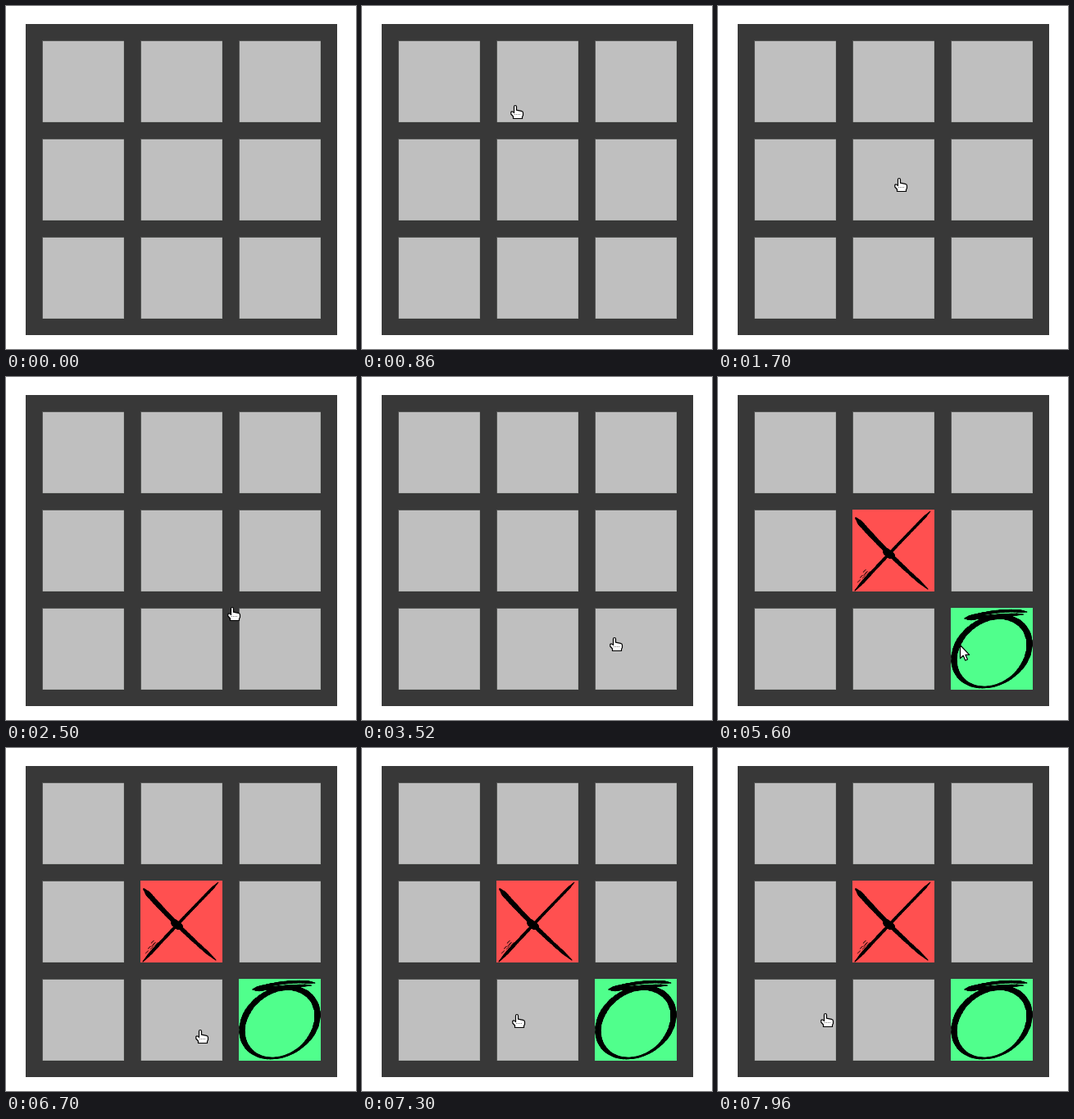
An HTML page with a canvas that plays this animation: 427 px wide and 419 px high, repeating every 8 s.

```html
<!DOCTYPE html>
<html lang="en">
<head>
<meta charset="utf-8">
<title>Noughts and crosses</title>
<style>
html, body { margin: 0; width: 100%; height: 100%; overflow: hidden; background: #fff; }
canvas { display: block; }
</style>
</head>
<body>
<canvas id="stage" width="427" height="419"></canvas>
<script>
const ctx = document.getElementById('stage').getContext('2d');
const LOOP = 8000, CELL = 100, PITCH = 120, LEFT = 44, TOP = 42, TICK = 60;
const ENTER = 420, PICK = 4480, CROSS_AT = 5040, RING_AT = 5060;

// Pointer moves: start, end, and the place reached
const START = [142, 17];
const MOVES = [
  [ENTER, 1100, 214, 186],
  [1400, 1700, 220, 210],
  [1820, 1820, 220, 213],
  [1980, 2780, 302, 313],
  [2820, 2820, 307, 317],
  [3520, 3520, 307, 318],
  [5460, 5600, 295, 327],
  [5720, 6180, 271, 341],
  [6280, 6700, 236, 344],
  [6740, 6840, 220, 339],
  [7000, 7000, 204, 331],
  [7140, 7500, 171, 319],
  [7500, 7840, 138, 321],
  [7960, 7960, 130, 324]
];

const HAND = new Path2D('M4.5 9V2Q4.5 .5 6 .5T7.5 2V6.2L13.5 7.3Q15.5 7.8 15.5 9.5V12.5L14.5 14.5V16.5H3.5V14L.8 11V8.5Q2.5 7 4.5 9.5Z');
const ARROW = new Path2D('M.5 .5V16.7L4.2 13.3L6.8 19.2L9.4 18L6.9 12.3H11.7Z');

function seeded(seed) {
  return () => (seed = seed * 16807 % 2147483647) / 2147483647;
}

// Stamps dots along a path that gives [x, y, width] for u from 0 to 1
function paint(path, random, steps = 220) {
  for (let i = 0; i <= steps; i++) {
    const [x, y, w] = path(i / steps);
    ctx.beginPath();
    ctx.arc(x, y, w / 2 * (.85 + .25 * random()), 0, 7);
    ctx.fill();
  }
}

// Quadratic brush stroke with tapered ends
function stroke(from, bend, to, w0, w1) {
  return u => {
    const at = k => (1 - u) ** 2 * from[k] + 2 * u * (1 - u) * bend[k] + u * u * to[k];
    const taper = Math.min(1, .3 + 10 * u, .3 + 6 * (1 - u));
    return [at(0), at(1), (w0 + (w1 - w0) * u) * taper];
  };
}

function cross() {
  const random = seeded(71);
  paint(stroke([4, 10], [44, 56], [92, 97], 6, 3.6), random);
  paint(stroke([95, 2], [43, 55], [3, 99], 3.2, 3.8), random);
  paint(stroke([41, 51], [45, 55], [49, 57], 8, 7), random);
  // Dry-brush streaks beside the rising arm
  for (let i = 0; i < 7; i++) {
    const x = 5 + 14 * random(), y = 89 - x + 8 * random(), len = 2 + 4 * random();
    paint(stroke([x, y], [x + len / 2, y - len / 2], [x + len, y - len], .8, .8), random, 12);
  }
}

function ring() {
  const random = seeded(29);
  paint(u => {
    const a = u * Math.PI * 2;
    return [50 + 46 * Math.cos(a), 54 + 43 * Math.sin(a - .22),
      4 + 3 * Math.cos(a) ** 2 - 1.5 * Math.sin(a)];
  }, random, 500);
  paint(stroke([17, 13], [60, 0], [93, 5], 4, 3), random);
  paint(stroke([20, 14], [55, 8], [89, 8], 4, 2.5), random);
}

function rect(color, x, y, w, h) {
  ctx.fillStyle = color;
  ctx.fillRect(x, y, w, h);
}

function tile(col, row, color, mark) {
  ctx.save();
  ctx.translate(LEFT + col * PITCH, TOP + row * PITCH);
  if (color) {
    rect(color, 0, 0, CELL, CELL);
  } else {
    rect('#555655', 0, 0, CELL, CELL);
    rect('#adb0ad', 1, 1, CELL - 1, CELL - 1);
    rect('#bfbfbf', 1, 1, CELL - 2, CELL - 2);
  }
  if (mark) {
    ctx.beginPath();
    ctx.rect(0, 0, CELL, CELL);
    ctx.clip();
    ctx.fillStyle = '#000';
    mark();
  }
  ctx.restore();
}

function pointerAt(t) {
  let [x, y] = START;
  for (const [from, to, toX, toY] of MOVES) {
    if (t < from) break;
    const ticks = Math.floor((t - from) / TICK) + (from > ENTER ? 1 : 0);
    const p = t >= to ? 1 : Math.min(1, ticks * TICK / (to - from));
    x += (toX - x) * p;
    y += (toY - y) * p;
  }
  return [Math.round(x), Math.round(y)];
}

function pointer(t) {
  if (t < ENTER) return;
  const [x, y] = pointerAt(t);
  const taken = t >= PICK && x > 274 && y > 272;
  const arrow = y < 32 || taken;
  const shape = arrow ? ARROW : HAND;
  ctx.save();
  ctx.translate(x - (arrow ? 0 : 5), y);
  ctx.fillStyle = '#fff';
  ctx.strokeStyle = '#000';
  ctx.lineWidth = 1.2;
  ctx.lineJoin = 'round';
  ctx.fill(shape);
  ctx.stroke(shape);
  if (!arrow) for (let i = 0; i < 4; i++) rect('#777', 5 + i * 2, 11, 1, 1);
  ctx.restore();
}

function draw(t) {
  rect('#fff', 0, 0, 427, 419);
  rect('#383838', 24, 22, 380, 380);
  for (let i = 0; i < 9; i++) tile(i % 3, Math.floor(i / 3));
  if (t >= CROSS_AT) tile(1, 1, '#ff5050', cross);
  if (t >= PICK) tile(2, 2, '#50ff8c', t >= RING_AT ? ring : null);
  pointer(t);
}

const begin = performance.now();
function frame() {
  draw((performance.now() - begin) % LOOP);
  requestAnimationFrame(frame);
}
frame();
</script>
</body>
</html>
```
